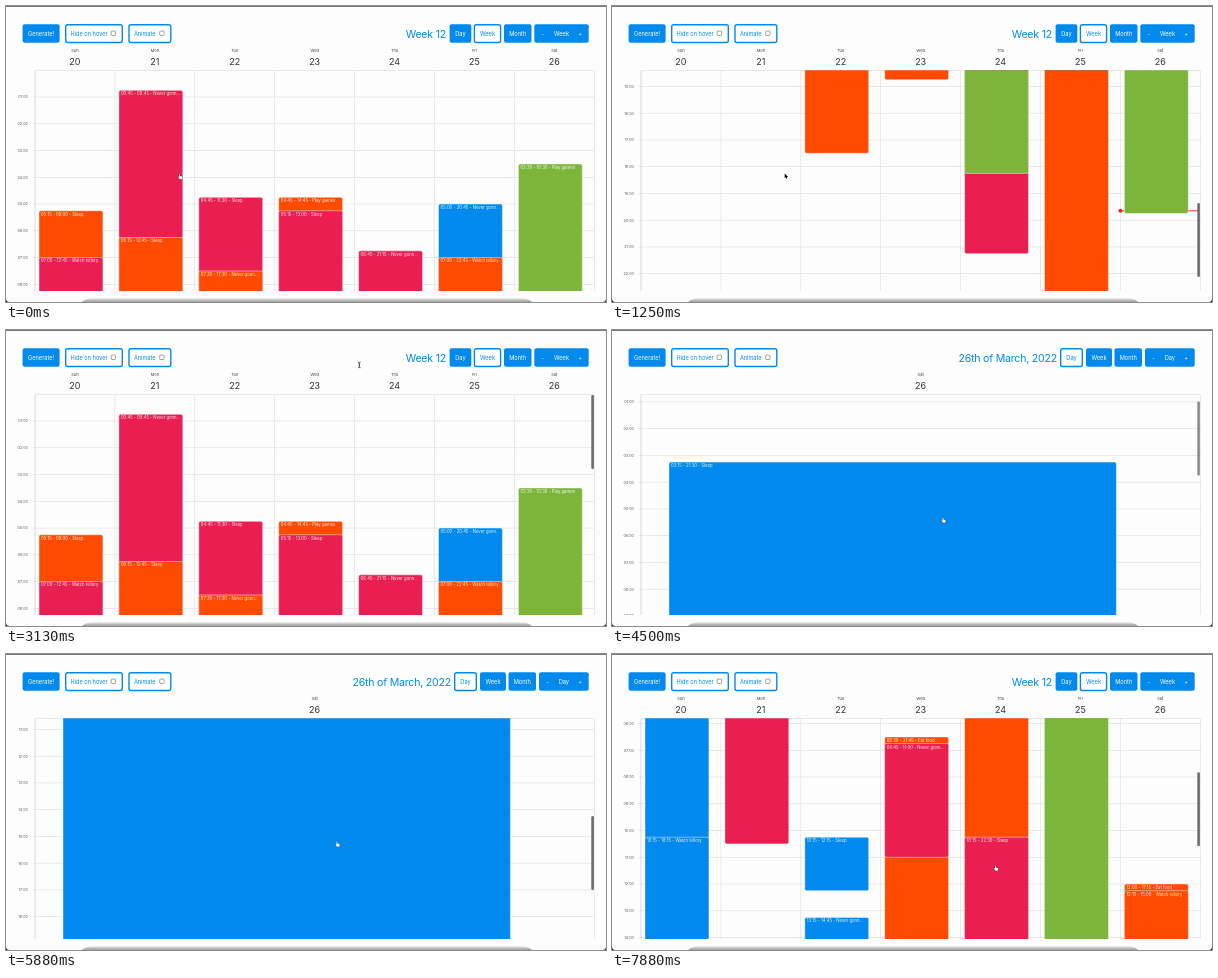
Write an HTML page with a canvas that moves like this. It is 600 px wide and 296 px high and loops after 8000 ms.

```html
<!DOCTYPE html>
<html>
<head>
<meta charset="utf-8">
<title>Calendar</title>
<style>
html, body { margin: 0; width: 100%; height: 100%; overflow: hidden; background: #fdfdfd; }
canvas { display: block; width: 600px; height: 296px; }
</style>
</head>
<body>
<canvas></canvas>
<script>
const LOOP = 8000, HOUR = 26.75, TOP = 64.3, BOTTOM = 285, LEFT = 29, GRID = 559.3;
const DAY_AT = 3600, WEEK_AT = 6560;
const BLUE = '#008aee';
const COLORS = { p: '#ea1e50', o: '#ff4a00', g: '#7cb53a', b: BLUE };
const DAYS = ['Sun', 'Mon', 'Tue', 'Wed', 'Thu', 'Fri', 'Sat'];

// day, start, end, colour, title
const parse = text => text.trim().split('\n').map(line => {
  const [day, from, to, color, ...title] = line.trim().split(' ');
  const hours = s => +s.slice(0, 2) + s.slice(3) / 60;
  return { day: +day, start: hours(from), end: hours(to), color: COLORS[color],
    label: `${from} - ${to} - ${title.join(' ')}` };
});
const firstWeek = parse(`
  0 05:15 09:00 o Sleep
  0 07:00 12:45 p Watch tellory
  1 00:45 09:45 p Never gonn...
  1 06:15 12:45 o Sleep
  2 04:45 11:30 p Sleep
  2 07:30 17:30 o Never gonn...
  3 04:45 14:45 o Play games
  3 05:15 13:00 p Sleep
  4 06:45 21:15 p Never gonn...
  4 09:30 18:15 g Sleep
  5 05:00 20:45 b Never gonn...
  5 07:00 22:45 o Watch tellory
  6 03:30 10:30 g Play games
  6 12:30 19:45 g Eat food`);
const singleDay = parse('0 03:15 21:30 b Sleep');
const secondWeek = parse(`
  0 04:00 14:00 b Play games
  0 10:15 18:15 b Watch tellory
  1 02:00 10:30 p Sleep
  2 10:15 12:15 b Sleep
  2 13:15 14:45 b Never gonn...
  3 06:30 21:45 o Eat food
  3 06:45 11:00 p Never gonn...
  4 00:00 14:45 o Watch tellory
  4 10:15 22:30 p Sleep
  5 00:00 17:00 g Watch tellory
  5 04:30 20:00 g Watch tellory
  6 12:00 17:15 o Eat food
  6 12:15 15:00 o Watch tellory`);

// keyframes: time, value(s)
const scrollKeys = [[100, 0], [630, 178], [1250, 385], [1630, 421], [2130, 421], [2250, 412],
  [2720, 0], [4450, 0], [5250, 300], [5600, 421], [5750, 421], [6150, 0], [7380, 0],
  [7880, 155], [8000, 190]];
const pointerKeys = [[0, 172.7, 167.5], [2700, 172.7, 167.5], [3130, 353, 35], [3450, 455, 28],
  [3800, 455, 28], [4350, 330, 187], [6150, 330, 187], [6500, 490.7, 31], [7000, 490.7, 31],
  [7350, 382.5, 211]];
const thumbKeys = [[80, 0], [180, 1], [3150, 1], [3400, 0], [4430, 0], [4520, 1], [6250, 1],
  [6450, 0], [7360, 0], [7450, 1]];

function tween(keys, t) {
  const i = keys.findIndex(k => k[0] > t);
  if (i < 1) return (i ? keys[keys.length - 1] : keys[0]).slice(1);
  const a = keys[i - 1], b = keys[i], f = (t - a[0]) / (b[0] - a[0]);
  return a.slice(1).map((v, n) => v + (b[n + 1] - v) * f);
}

const canvas = document.querySelector('canvas'), c = canvas.getContext('2d');
const ratio = window.devicePixelRatio || 1;
canvas.width = 600 * ratio;
canvas.height = 296 * ratio;

function rect(x, y, w, h, color) {
  c.fillStyle = color;
  c.fillRect(x, y, w, h);
}
function round(x, y, w, h, r, fill, stroke, width = 1) {
  c.beginPath();
  c.roundRect(x, y, w, h, r);
  if (fill) { c.fillStyle = fill; c.fill(); }
  if (stroke) { c.strokeStyle = stroke; c.lineWidth = width; c.stroke(); }
}
function text(s, x, y, size, color, align = 'center', spacing = 0) {
  c.font = `${size}px Inter, "Liberation Sans", sans-serif`;
  c.letterSpacing = spacing + 'px';
  c.textAlign = align;
  c.textBaseline = 'alphabetic';
  c.fillStyle = color;
  c.fillText(s, x, y + size * .364);
}
function button(x, right, label, outlined) {
  if (outlined) round(x + .7, 18.7, right - x - 1.4, 17.8, 2, '#fff', BLUE, 1.4);
  else round(x, 18.3, right - x, 18.5, 2, BLUE);
  text(label, (x + right) / 2, 27.6, 5.7, outlined ? BLUE : '#fff');
}
function toggle(x, right, label) {
  button(x, right, '', true);
  text(label, x + 5.6, 27.6, 5.6, BLUE, 'left');
  round(right - 11.8, 25.1, 4.4, 4.4, .8, '#fff', '#666', .6);
}

function header(dayView) {
  button(16.6, 53.6, 'Generate!');
  toggle(59, 117, 'Hide on hover');
  toggle(122.3, 165.5, 'Animate');
  text(dayView ? '26th of March, 2022' : 'Week 12', dayView ? 445 : 440, 27.8, 10.6, BLUE, 'right', -.22);
  const edges = dayView ? [448, 471, 474, 500, 502.5, 530, 533] : [443.6, 465.3, 467.7, 495.3, 498, 525.5, 528.3];
  button(edges[0], edges[1], 'Day', dayView);
  button(edges[2], edges[3], 'Week', !dayView);
  button(edges[4], edges[5], 'Month');
  button(edges[6], 582.7, dayView ? 'Day' : 'Week');
  text('-', edges[6] + 8.5, 27.6, 5.7, '#fff');
  text('+', 574.2, 27.6, 5.7, '#fff');
}

function pointer(x, y, kind) {
  c.save();
  c.translate(x, y);
  if (kind === 'text') {
    c.strokeStyle = '#333';
    c.lineWidth = .7;
    c.stroke(new Path2D('M-1.3-2.8Q0-2.8 0-2V2Q0 2.8-1.3 2.8M1.3-2.8Q0-2.8 0-2V2Q0 2.8 1.3 2.8'));
  } else {
    const hand = kind === 'hand';
    const shape = new Path2D(hand
      ? 'M.4.7Q1.1.2 1.4 1V2.5L3.4 2.9Q3.9 3.1 3.8 4L3.2 5.8H1L-.6 3.7Q-.3 3 .5 3.6Z'
      : 'M0 0V4.7L1.1 3.8L1.9 5.5L2.7 5.1L2 3.5H3.4Z');
    c.fillStyle = hand ? '#fff' : '#000';
    c.strokeStyle = hand ? '#222' : '#fff';
    c.lineWidth = hand ? .6 : .9;
    c.stroke(shape);
    c.fill(shape);
  }
  c.restore();
}

function screenEdges() {
  const shade = c.createLinearGradient(0, 291.5, 0, 296);
  shade.addColorStop(0, 'rgba(120,120,120,0)');
  shade.addColorStop(1, 'rgba(120,120,120,.75)');
  c.fillStyle = shade;
  c.beginPath();
  c.moveTo(76, 296);
  c.quadraticCurveTo(80, 291.5, 92, 291.5);
  c.lineTo(510, 291.5);
  c.quadraticCurveTo(522, 291.5, 526, 296);
  c.fill();
  rect(0, 0, 600, .8, '#555');
  c.fillStyle = '#111';
  c.fill(new Path2D('M0 296V292.5Q0 296 3.5 296ZM600 296V292.5Q600 296 596.5 296Z'));
}

function draw(t) {
  const dayView = t >= DAY_AT && t < WEEK_AT;
  const events = t < DAY_AT ? firstWeek : dayView ? singleDay : secondWeek;
  const columns = dayView ? ['Sat'] : DAYS;
  const width = GRID / columns.length;
  const [scroll] = tween(scrollKeys, t), [px, py] = tween(pointerKeys, t), [thumb] = tween(thumbKeys, t);
  const yOf = h => TOP + h * HOUR - scroll;
  let kind = py < 62 && px > 170 && px < 440 ? 'text' : 'arrow';

  c.setTransform(ratio, 0, 0, ratio, 0, 0);
  rect(0, 0, 600, 296, '#fdfdfd');
  header(dayView);
  columns.forEach((name, i) => {
    const mid = LEFT + (i + .5) * width;
    text(name, mid, 45, 4, '#444');
    text(dayView ? 26 : 20 + i, mid, 56, 9, '#333');
  });
  rect(LEFT, 64, GRID, .6, '#ddd');

  c.save();
  c.beginPath();
  c.rect(0, TOP, 600, BOTTOM - TOP);
  c.clip();
  for (let h = 1; h < 24; h++) {
    rect(LEFT - 2, yOf(h) - .3, GRID + 2, .6, '#dcdcdc');
    text(String(h).padStart(2, '0') + ':00', 21.8, yOf(h), 3.7, '#555', 'right');
  }
  for (let i = 0; i <= columns.length; i++) rect(LEFT + i * width - .3, TOP, .6, 221, i ? '#dcdcdc' : '#c4c4c4');

  // current time marker sits behind the events
  const nowX = LEFT + (columns.length - 1) * width, nowY = yOf(19.65);
  rect(nowX, nowY - .5, 586 - nowX, 1, '#e8261c');
  c.fillStyle = '#e8261c';
  c.beginPath();
  c.arc(nowX, nowY, 2, 0, 7);
  c.fill();

  for (const e of events) {
    const x = LEFT + (e.day + .05) * width, y = yOf(e.start), w = width * .8, h = (e.end - e.start) * HOUR;
    round(x, y, w, h, 1.8, e.color, 'rgba(255,255,255,.75)', .6);
    text(e.label, x + 2, y + 3.4, 4.25, 'rgba(255,255,255,.92)', 'left');
    if (py > TOP && px > x && px < x + w && py > y && py < y + h) kind = 'hand';
  }
  c.restore();

  c.globalAlpha = thumb;
  round(585.3, 65 + scroll * .343, 2.6, 74, 1.3, '#6c6c6c');
  c.globalAlpha = 1;
  screenEdges();
  pointer(px, py, kind);
}

const begin = performance.now();
(function frame() {
  draw((performance.now() - begin) % LOOP);
  requestAnimationFrame(frame);
})();
</script>
</body>
</html>
```
